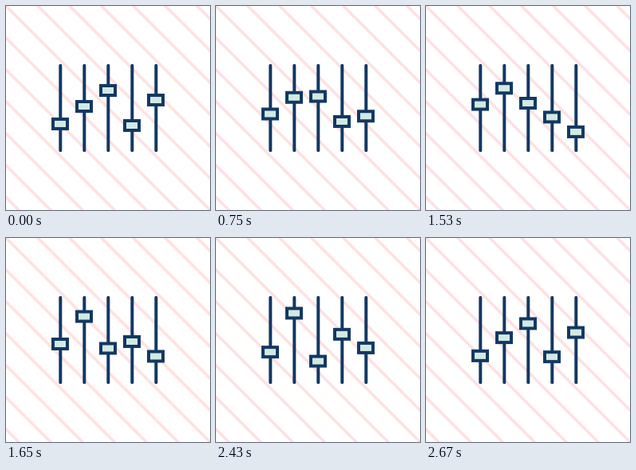
Animation, 256 px wide and 256 px high, one loop 2.7 s. Source, as an HTML page:

```html
<!DOCTYPE html>
<html lang="en">
<head>
<meta charset="utf-8">
<title>Equalizer sliders</title>
<style>
  html, body { margin: 0; width: 100%; height: 100%; overflow: hidden; background: #fff; }
  svg { display: block; width: 100vw; height: 100vh; }
  .stripes { stroke: #ffe1e1; stroke-width: 3.6; }
  .track { stroke: #133863; stroke-width: 4; stroke-linecap: round; }
  .knob { fill: #d1eae3; stroke: #133863; stroke-width: 4; }
</style>
</head>
<body>
<svg id="stage" viewBox="0 0 256 256"></svg>
<script>
  const LOOP = 2700, HOLD = 600, MOVE = 300, TICK = 30;
  // Knob centres for each of the three poses
  const POSES = [
    [148, 126, 106, 150, 118],
    [123, 103.5, 121, 140, 158.5],
    [143, 93.5, 156, 120, 138.5]
  ];
  const stage = document.getElementById('stage');

  function add(tag, attrs) {
    const el = document.createElementNS('http://www.w3.org/2000/svg', tag);
    for (const key in attrs) el.setAttribute(key, attrs[key]);
    return stage.appendChild(el);
  }

  for (let x = -240; x <= 240; x += 40) {
    add('line', { class: 'stripes', x1: x - 10, y1: -10, x2: x + 266, y2: 266 });
  }

  const knobs = POSES[0].map((_, i) => {
    const x = 68 + i * 30 + 0.3;
    add('line', { class: 'track', x1: x, y1: 74.8, x2: x, y2: 181.2 });
    return add('rect', { class: 'knob', x: 59 + i * 30, y: -6, width: 18, height: 12 });
  });

  const ease = p => p * p * (3 - 2 * p);

  function draw(now) {
    // Motion advances in 30 ms ticks
    const t = Math.floor((now % LOOP) / TICK) * TICK;
    const step = Math.floor(t / (HOLD + MOVE));
    const local = t % (HOLD + MOVE);
    const p = ease(Math.max(0, (local - HOLD) / MOVE));
    const from = POSES[step], to = POSES[(step + 1) % POSES.length];
    knobs.forEach((knob, i) => {
      const y = from[i] + (to[i] - from[i]) * p;
      knob.setAttribute('transform', `translate(0 ${y.toFixed(2)})`);
    });
  }

  function frame(now) {
    draw(now);
    requestAnimationFrame(frame);
  }
  draw(0);
  requestAnimationFrame(frame);
</script>
</body>
</html>
```
